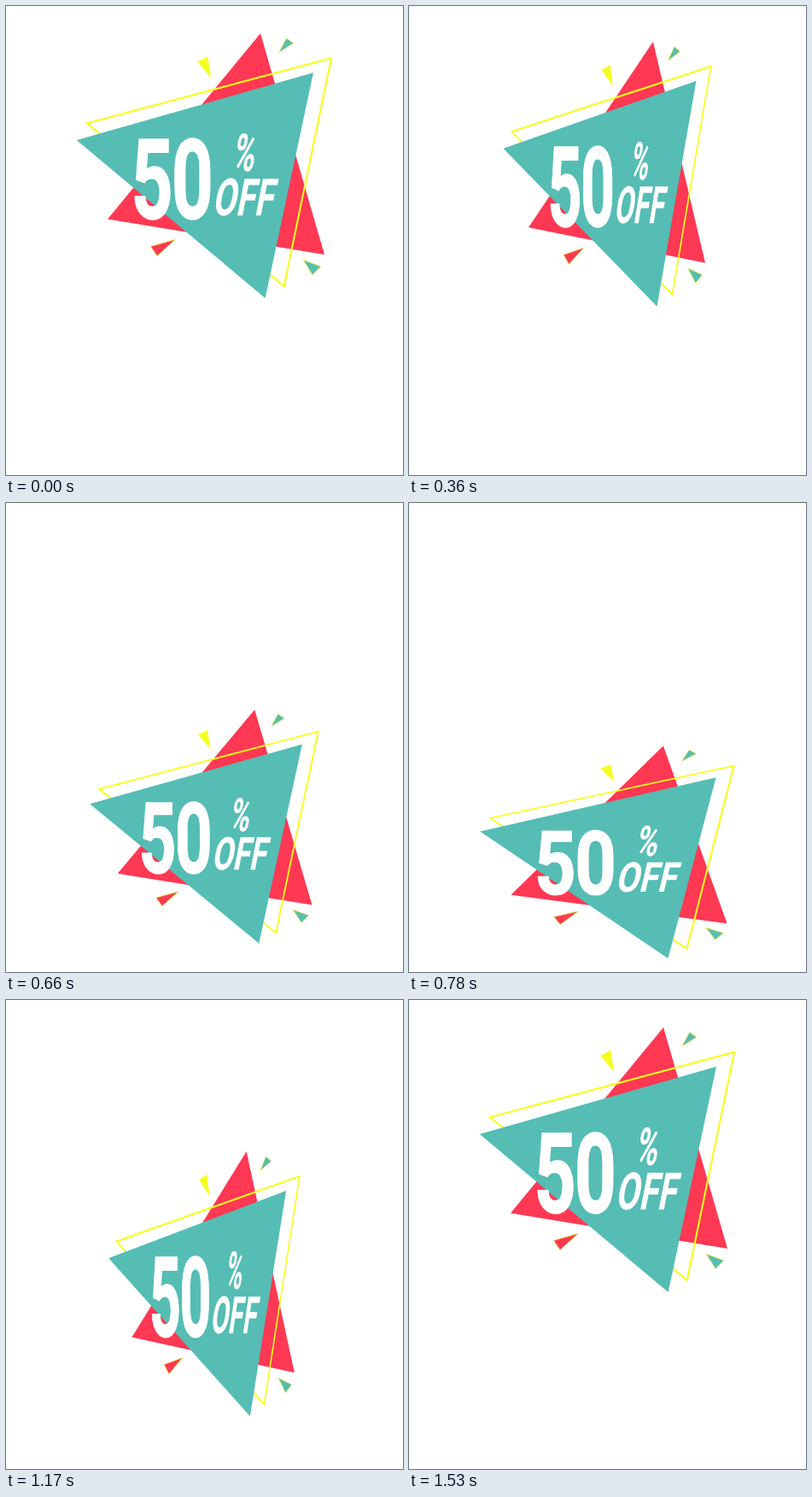
Animation of 465x549 px, one loop 1860 ms. Source, as an HTML page:

```html
<!DOCTYPE html>
<html lang="en">
<head>
<meta charset="utf-8">
<title>Sale badge</title>
<style>
  html, body { margin: 0; width: 100%; height: 100%; overflow: hidden; background: #fff; }
  svg { display: block; width: 100vw; height: 100vh; }
  text { font-family: Roboto, "Liberation Sans", sans-serif; font-weight: 700; fill: #fff; stroke: #fff; }
  .teal { fill: #55bdb4; }
  .red { fill: #ff3853; }
  .yellow { fill: #f4ff1f; }
  .chip { stroke: #d8e02a; stroke-width: .8; }
</style>
</head>
<body>
<svg viewBox="0 0 465 549">
  <g id="badge">
    <path class="red" d="M298 32L373 291L119 249.5Z"/>
    <path d="M95 137.3L381 61L325.7 328Z" fill="none" stroke="#f4ff1f" stroke-width="2.1"/>
    <path class="teal" d="M82.8 157L360 78L303.6 342Z"/>
    <path class="yellow" d="M224.3 65L236.3 59L240.3 84.5Z"/>
    <path class="teal chip" d="M320 54L328.5 38L336.5 43.5Z"/>
    <path class="red chip" d="M169.5 281.5L198 273.5L177 292.5Z"/>
    <path class="teal chip" d="M348.5 297.5L368.5 305L359 314.5Z"/>
    <text transform="translate(146.6 248.7) scale(.66 1)" font-size="130" letter-spacing="-3" stroke-width="1.5">50</text>
    <text transform="translate(263.5 193) skewX(-11) scale(.58 1)" font-size="61" stroke-width=".3">%</text>
    <text transform="translate(241.3 244.5) skewX(-11) scale(.66 1)" font-size="60" stroke-width=".3">OFF</text>
  </g>
</svg>
<script>
const LOOP = 1860, STEP = 30;
const PIVOT = { x: 232.5, y: 274 };
const DROP = 204.5, NARROW = 0.25, SQUASH = 0.2;
const badge = document.getElementById('badge');

// eased progress from time a to time b
function ease(t, a, b) {
  const x = Math.min(1, Math.max(0, (t - a) / (b - a)));
  return x * x * (3 - 2 * x);
}

function draw(t) {
  const land = ease(t, 540, 755);
  const spring = ease(t, 755, 1133);
  const settle = ease(t, 1204, 1530);
  const sx = 1 - NARROW * (ease(t, 0, 540) - land + spring - settle);
  const sy = 1 - SQUASH * (land - spring);
  const dy = DROP * (ease(t, 300, 755) - ease(t, 1010, 1460));
  badge.setAttribute('transform',
    `translate(${PIVOT.x} ${PIVOT.y + dy}) scale(${sx} ${sy}) translate(${-PIVOT.x} ${-PIVOT.y})`);
}

let start;
function tick(now) {
  start ??= now;
  const t = (now - start) % LOOP;
  draw(Math.floor(t / STEP) * STEP);
  requestAnimationFrame(tick);
}
draw(0);
requestAnimationFrame(tick);
</script>
</body>
</html>
```
